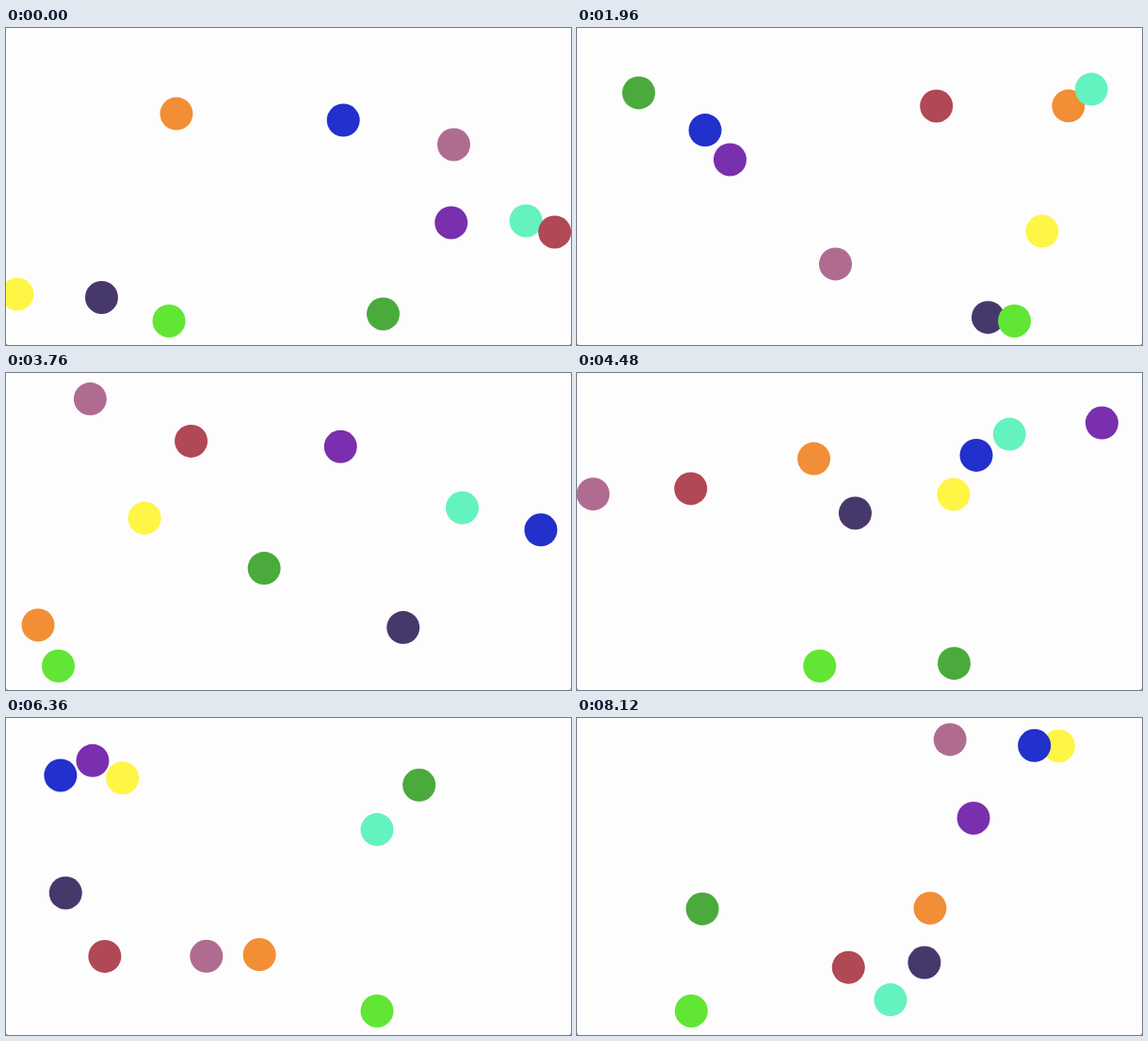
Recreate the animation shown at these times as an HTML page. Size 600x337 px, loop 8.16 s.

```html
<!DOCTYPE html>
<html lang="en">
<head>
<meta charset="utf-8">
<title>Bouncing balls</title>
<style>
  html, body { margin: 0; width: 100%; height: 100%; overflow: hidden; background: #fefdfe; }
  svg { display: block; width: 600px; height: 337px; }
</style>
</head>
<body>
<svg id="stage" viewBox="0 0 600 337">
  <path d="M0 335 L2 337 H0 Z M600 335 L598 337 H600 Z" fill="#aaa"/>
</svg>
<script>
const SCALE = 600 / 1021;
const RADIUS = 17.5;
const FRAME_MS = 40;
const FRAMES = 204;
const NEAR = 28.3, RIGHT = 991, BOTTOM = 543.5;

// color, x, y, x speed, y speed (world units per step), back to front
const BALLS = [
  ['#4aab3c', 681.5, 517.3, -5, 4],
  ['#b06c90', 809.1, 211, -3, 4],
  ['#7a2fae', 804.5, 352.2, 8, -1],
  ['#f28e35', 308, 155, -10, 7],
  ['#fff545', 20.4, 481.6, 10, -1],
  ['#2230cc', 609.5, 166.8, -7, -9],
  ['#64f3bf', 939.5, 348.8, 1, 7],
  ['#47386c', 172.7, 487.5, 5, -9],
  ['#b04856', 991.5, 369.2, -3, -2],
  ['#62e635', 294.5, 530, 8, 0]
];

// The frame rate drifts a little: [frame, simulation steps done]
const PACE = [[0, 0], [22, 52], [77, 178], [112, 262], [139, 325], [179, 420], [203, 477]];
const LAST_STEP = PACE[PACE.length - 1][1];

function stepAt(frame) {
  const i = PACE.findIndex(([f]) => f >= frame);
  if (i === 0) return 0;
  const [f0, n0] = PACE[i - 1], [f1, n1] = PACE[i];
  return Math.round(n0 + (n1 - n0) * (frame - f0) / (f1 - f0));
}

// Positions along one axis, turning back after crossing a wall
function bouncePath(pos, speed, far) {
  const path = [pos * SCALE];
  for (let i = 0; i < LAST_STEP; i++) {
    pos += speed;
    if (pos < NEAR || pos > far) speed = -speed;
    path.push(pos * SCALE);
  }
  return path;
}

const stage = document.getElementById('stage');
const balls = BALLS.map(([color, x, y, vx, vy]) => {
  const node = document.createElementNS('http://www.w3.org/2000/svg', 'circle');
  node.setAttribute('r', RADIUS);
  node.setAttribute('fill', color);
  stage.append(node);
  return { node, xs: bouncePath(x, vx, RIGHT), ys: bouncePath(y, vy, BOTTOM) };
});

function draw(ms) {
  const step = stepAt(Math.floor(ms / FRAME_MS) % FRAMES);
  for (const { node, xs, ys } of balls) {
    node.setAttribute('cx', xs[step]);
    node.setAttribute('cy', ys[step]);
  }
}

const start = performance.now();
function tick() {
  draw(performance.now() - start);
  requestAnimationFrame(tick);
}
tick();
</script>
</body>
</html>
```
